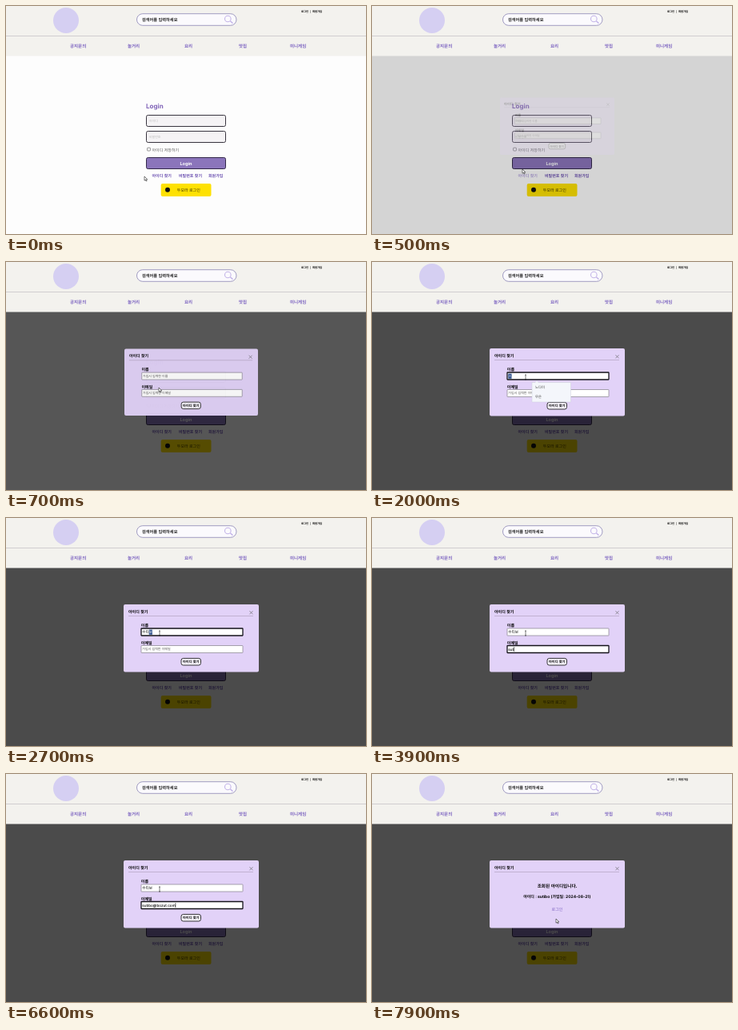
An HTML page that plays this animation: 450x285 px, repeating every 8 s.

```html
<!DOCTYPE html>
<html lang="ko">
<head>
<meta charset="utf-8">
<style>
html, body { margin: 0; width: 100%; height: 100%; overflow: hidden; background: #fdfdfd; }
svg { display: block; width: 100%; height: 100%; }
text { font: 700 5px "Noto Sans CJK KR", "Noto Sans CJK", sans-serif; text-rendering: geometricPrecision; white-space: pre; }
.latin { font-family: Inter, "Noto Sans CJK KR", sans-serif; }
.nav text { font-size: 5.5px; fill: #7b62c0; }
.top text { font-size: 3.3px; }
.links text { fill: #6a4fb0; }
.links .hover { fill: #b3a3dd; }
.hint { font-size: 4px; font-weight: 500; fill: #555; }
.pale { font-size: 3.9px; font-weight: 400; fill: #bbb; }
.box { fill: #f5f3f5; stroke: #38343f; }
.field { fill: #fff; stroke: #85808c; stroke-width: .7; }
.field.focus { stroke: #15131a; stroke-width: 1.3; }
.typed { font-size: 4.6px; font-weight: 500; }
.option { font-size: 4.3px; font-weight: 400; fill: #444; }
.mid { text-anchor: middle; }
</style>
</head>
<body>
<svg viewBox="0 0 450 285">
  <rect width="450" height="285" fill="#fdfdfd"/>

  <!-- login form -->
  <text class="latin" x="175" y="128.3" style="font-size:8px" fill="#8064b8">Login</text>
  <rect class="box" x="175.5" y="136.5" width="99" height="14" rx="2"/>
  <rect class="box" x="175.5" y="156.5" width="99" height="14" rx="2"/>
  <text class="pale" x="179" y="145">아이디</text>
  <text class="pale" x="179" y="165">비밀번호</text>
  <rect x="176.6" y="177.2" width="3.8" height="3.8" rx=".6" fill="#fff" stroke="#666" stroke-width=".7"/>
  <text x="182.5" y="181.6" fill="#555" style="font-weight:500">아이디 저장하기</text>
  <rect x="175.5" y="189.5" width="99" height="14" rx="2" fill="#8b75bb" stroke="#33294a"/>
  <text class="latin mid" x="225" y="198.5" style="font-size:5.6px" fill="#fff">Login</text>
  <g class="links">
    <text id="find" x="182.5" y="214">아이디 찾기</text>
    <text x="216" y="214">비밀번호 찾기</text>
    <text x="253" y="214">회원가입</text>
  </g>
  <rect x="193.7" y="222" width="62.8" height="16" rx="2" fill="#fee102"/>
  <circle cx="202" cy="229.7" r="3" fill="#111"/>
  <text class="mid" x="228.3" y="232" style="font-weight:500" fill="#3a3000">두모라 로그인</text>

  <rect id="shade" y="62" width="450" height="223"/>

  <!-- header -->
  <rect width="450" height="62.5" fill="#f3f2ee"/>
  <path d="M0 37.5H450" stroke="#d0ced0"/>
  <circle cx="75" cy="18" r="16" fill="#d5cff2"/>
  <rect x="163.5" y="9.7" width="124.5" height="14.6" rx="7.3" fill="#fbfafd" stroke="#8b84b4" stroke-width=".8"/>
  <text x="170" y="18.9" style="font-size:5.2px" fill="#222">검색어를 입력하세요</text>
  <path d="M280.3 18.8L283.5 21.6" stroke="#c4b5e8" stroke-width="1.4"/>
  <circle cx="277.3" cy="16" r="3.8" fill="none" stroke="#c4b5e8" stroke-width="1.1"/>
  <g class="top">
    <text x="369" y="8.2">로그인</text>
    <text x="380.3" y="8">|</text>
    <text x="383" y="8.2">회원가입</text>
  </g>
  <g class="nav">
    <text x="80" y="52">공지문의</text>
    <text x="152" y="52">놀거리</text>
    <text x="223" y="52">요리</text>
    <text x="291" y="52">맛집</text>
    <text x="355" y="52">미니게임</text>
  </g>

  <!-- dialog -->
  <g id="modal">
    <rect x="147" y="108" width="169" height="84.5" rx="2" fill="#e2d2f8"/>
    <text x="153" y="118.8">아이디 찾기</text>
    <path d="M153 122.5H309" stroke="#b9a9c9" stroke-width=".8"/>
    <path d="M304.5 116.3l4 4m0-4l-4 4" stroke="#85808c" stroke-width=".9"/>
    <g id="form">
      <text x="168.8" y="136.2">이름</text>
      <text x="168.8" y="158">이메일</text>
      <rect class="field" id="nameBox" x="169" y="138" width="127" height="9" rx=".5"/>
      <rect class="field" id="mailBox" x="169" y="159.5" width="127" height="9" rx=".5"/>
      <text class="hint" id="nameHint" x="170.3" y="144">가입시 입력한 이름</text>
      <text class="hint" id="mailHint" x="170.3" y="165.4">가입시 입력한 이메일</text>
      <rect id="compose" y="139.6" height="6.2" fill="#35558f"/>
      <text class="typed" id="name" x="170.3" y="144.2"></text>
      <text class="typed latin" id="mail" x="170.3" y="165.6"></text>
      <rect id="caret" width=".6" height="5.6"/>
      <rect x="219" y="175.4" width="24.5" height="8.6" rx="2.6" fill="#f5f2fa" stroke="#222" stroke-width=".9"/>
      <text class="mid" x="231.2" y="181.3" style="font-size:4.2px">아이디 찾기</text>
      <g id="options">
        <path d="M200 150.5h4l2-2l2 2h40.5v24.5h-48.5z" fill="#f4f6fb" stroke="#cfd0dc" stroke-width=".5"/>
        <text class="option" x="204" y="158.4">노다미</text>
        <text class="option" x="204" y="169.6">무온</text>
      </g>
    </g>
    <g id="result" class="mid">
      <text x="231.5" y="142.4" style="font-size:5.6px">조회된 아이디입니다.</text>
      <text class="latin" x="231.3" y="154.6">아이디 : sutibo (가입일: 2024-08-21)</text>
      <text x="231.5" y="171.4" style="font-weight:500" fill="#7b62c0">로그인</text>
    </g>
  </g>

  <path id="arrow" d="M0 0V5.2L1.3 4.1L2.2 6L3.1 5.6L2.3 3.8H3.8Z" fill="#fff" stroke="#222" stroke-width=".6"/>
  <path id="beam" d="M-1 -3H1M0 -3V3M-1 3H1" fill="none" stroke="#222" stroke-width=".6"/>
</svg>
<script>
const $ = id => document.getElementById(id);
const show = (id, on) => $(id).setAttribute('display', on ? 'inline' : 'none');
const set = (id, attrs) => { for (const k in attrs) $(id).setAttribute(k, attrs[k]); };

const LOOP = 8000, STEP = 100;
const opening = [[400, 0], [500, .23], [600, .63], [700, .94], [800, 1]];
const pointer = [
  [0, 173, 213], [100, 180, 212], [200, 188, 211], [400, 188, 211], [500, 188, 204],
  [600, 190.5, 171], [700, 191, 157], [800, 191.5, 149], [1000, 192, 144], [7000, 192, 144],
  [7200, 208, 158], [7400, 228, 186], [7500, 231, 191], [7700, 230, 181]
];
const nameSteps = [[2000, 'ㅅ'], [2200, '수'], [2300, '숱'], [2400, '수티'], [2600, '수팁'], [2700, '수티보']];
const address = 'sutibo@bozut.com';
const keyTimes = [3500, 3700, 3900, 4000, 4200, 4400, 5100, 5300, 5400, 5600, 5800, 5900, 6200, 6300, 6400, 6600];

// Linear interpolation through rows of [time, ...values]
function at(rows, t) {
  const i = rows.findIndex(r => r[0] > t);
  if (i === 0) return rows[0].slice(1);
  if (i < 0) return rows[rows.length - 1].slice(1);
  const a = rows[i - 1], b = rows[i], k = (t - a[0]) / (b[0] - a[0]);
  return a.slice(1).map((v, j) => v + (b[j + 1] - v) * k);
}

function write(id, value) {
  $(id).textContent = value;
  show(id + 'Hint', !value);
  return value ? $(id).getComputedTextLength() : 0;
}

function draw(t) {
  const [p] = at(opening, t), [x, y] = at(pointer, t);
  set('shade', { opacity: .7 * p });
  const s = .8 + .2 * p;
  set('modal', { opacity: p, transform: `translate(231.5 150.2) scale(${s}) translate(-231.5 -150.2)` });
  $('find').classList.toggle('hover', t >= 200 && t < 600);

  const done = t >= 7700;
  show('form', !done);
  show('result', done);
  show('options', t >= 2000 && t < 2300);

  const onName = t >= 1000 && t < 3000, onMail = t >= 3000 && t < 7500;
  $('nameBox').classList.toggle('focus', onName);
  $('mailBox').classList.toggle('focus', onMail);

  const name = (nameSteps.filter(r => r[0] <= t).pop() || [0, ''])[1];
  const nameWidth = write('name', name);
  const mailWidth = write('mail', address.slice(0, keyTimes.filter(k => k <= t).length));

  // The syllable being composed is drawn as a block
  const composing = onName && name;
  show('compose', composing);
  const glyph = name ? nameWidth / name.length : 0;
  set('compose', { x: 170.3 + nameWidth - glyph, width: glyph });
  $('name').innerHTML = composing ? `${name.slice(0, -1)}<tspan fill="#fff">${name.slice(-1)}</tspan>` : name;

  show('caret', onMail || (onName && t < 1500));
  set('caret', { x: 170.2 + (onMail ? mailWidth : 0), y: onMail ? 161.2 : 140.2 });

  const overField = t >= 800 && !done && (y >= 138 && y <= 149 || y >= 159 && y <= 169);
  show('beam', overField);
  show('arrow', !overField);
  set(overField ? 'beam' : 'arrow', { transform: `translate(${x} ${y})` });
}

function frame() {
  draw(Math.floor(performance.now() % LOOP / STEP) * STEP);
  requestAnimationFrame(frame);
}
frame();
</script>
</body>
</html>
```
